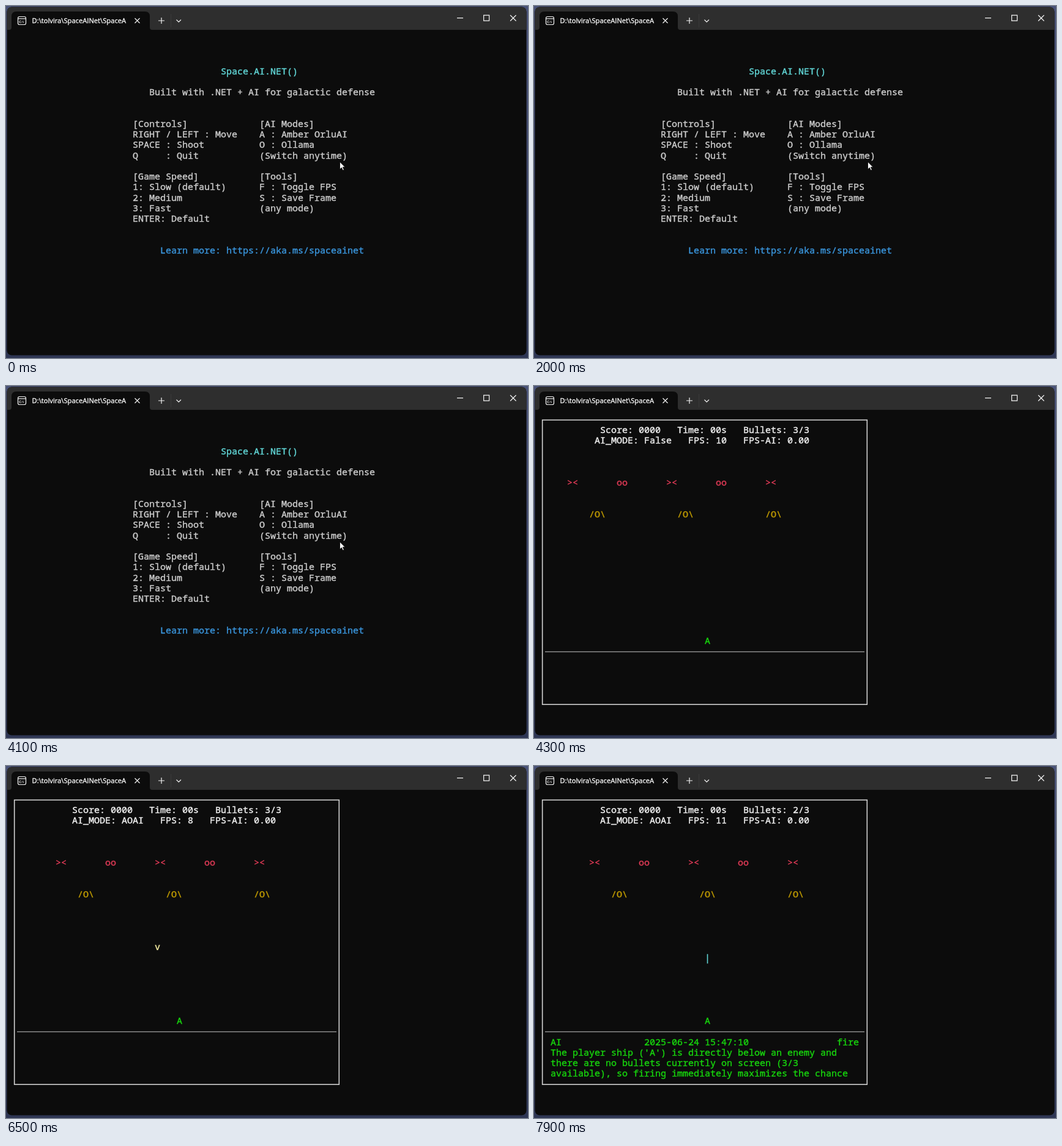
An HTML page that plays this animation: 853 px wide and 576 px high, repeating every 8 s.

```html
<!DOCTYPE html>
<html lang="en">
<head>
<meta charset="utf-8">
<title>Terminal game</title>
<style>
  html, body { margin: 0; width: 100%; height: 100%; overflow: hidden; background: #3b4468; }
  svg { display: block; width: 853px; height: 576px; }
  .cell { font: 15px "Noto Sans Mono", monospace; white-space: pre; font-variant-ligatures: none; stroke-width: .4; }
  .tab { font: 11.2px "Open Sans", "Noto Sans", sans-serif; fill: #fff; stroke: #fff; stroke-width: .3; }
  .icon { fill: none; stroke: #f4f4f4; stroke-width: 1.2; }
</style>
</head>
<body>
<svg viewBox="0 0 853 576">
  <defs>
    <linearGradient id="desk" x2="0" y2="1">
      <stop offset="0" stop-color="#4a5379"/>
      <stop offset="1" stop-color="#2e3654"/>
    </linearGradient>
    <clipPath id="win"><rect x="1.5" y="1.5" width="849" height="570" rx="8"/></clipPath>
    <clipPath id="label"><rect x="40" y="12" width="156.5" height="24"/></clipPath>
  </defs>
  <rect width="853" height="576" fill="url(#desk)"/>
  <g clip-path="url(#win)">
    <rect width="853" height="576" fill="#0c0c0c"/>
    <rect width="853" height="39" fill="#2e2e2e"/>
    <path d="M5 39q4 0 4-4V17q0-8 8-8H227q8 0 8 8V35q0 4 4 4z" fill="#0c0c0c"/>
  </g>
  <g class="icon">
    <rect x="19.5" y="17.5" width="13" height="13" rx="2.5"/>
    <path d="M19.5 20.8h13"/>
    <path d="M210.5 20l8 8m0-8l-8 8M249 24h10m-5-5v10M278.5 22.5l3.7 3.7 3.7-3.7"/>
    <path d="M737 19.6h10M780.6 15.1h9v9h-9zM824 15l9.5 9.5m0-9.5l-9.5 9.5"/>
    <path d="M269.5 13v22" stroke="#3a3a3a" stroke-width="1"/>
  </g>
  <text x="21" y="28.3" fill="#f4f4f4" font-family="Liberation Sans, sans-serif" font-size="6" font-weight="700">C:\</text>
  <text class="tab" x="42.5" y="28" clip-path="url(#label)">D:\tolvira\SpaceAINet\SpaceAINet</text>

  <g id="menu">
    <path d="M545.5 255v12.2l2.9-2.6 2 4.5 2-.9-2-4.4h3.8z" fill="#fff" stroke="#000" stroke-width=".8"/>
  </g>
  <g id="game">
    <rect x="13.7" y="55.6" width="530.6" height="465.5" fill="none" stroke="#d2d2d2" stroke-width="1.6"/>
    <path d="M18 434.8H540" stroke="#a4a4a4" stroke-width="1.2"/>
  </g>
</svg>
<script>
const LOOP = 8000, CELL_W = 9, CELL_H = 17.24;
const GREY = '#cccccc', WHITE = '#f2f2f2', CYAN = '#61d6d6', BLUE = '#3a96dd',
      RED = '#de3a56', GOLD = '#c19c00', GREEN = '#17d40d', CREAM = '#f9f1a5';
const menu = document.getElementById('menu'), game = document.getElementById('game');

function make(parent, tag, attrs) {
  const el = document.createElementNS('http://www.w3.org/2000/svg', tag);
  for (const k in attrs) el.setAttribute(k, attrs[k]);
  return parent.appendChild(el);
}
function place(el, col, row) {
  el.setAttribute('x', col * CELL_W);
  el.setAttribute('y', 60 + row * CELL_H);
}
function print(parent, col, row, str, color) {
  const el = make(parent, 'text', { class: 'cell', fill: color, stroke: color });
  el.textContent = str;
  place(el, col, row);
  return el;
}
function show(el, on) { el.style.display = on ? '' : 'none'; }

// Latest value in a table of [time, value] steps
function at(steps, t) {
  let v = steps[0][1];
  for (const [time, value] of steps) if (t >= time) v = value;
  return v;
}

const block = (col, row, lines) => lines.forEach((s, i) => print(menu, col, row + i, s, GREY));
print(menu, 39, 3, 'Space.AI.NET()', CYAN);
print(menu, 26, 5, 'Built with .NET + AI for galactic defense', GREY);
block(23, 8, ['[Controls]', 'RIGHT / LEFT : Move', 'SPACE : Shoot', 'Q     : Quit']);
block(46, 8, ['[AI Modes]', 'A : Amber OrluAI', 'O : Ollama', '(Switch anytime)']);
block(23, 13, ['[Game Speed]', '1: Slow (default)', '2: Medium', '3: Fast', 'ENTER: Default']);
block(46, 13, ['[Tools]', 'F : Toggle FPS', 'S : Save Frame', '(any mode)']);
print(menu, 28, 20, 'Learn more: https://aka.ms/spaceainet', BLUE);

const score = print(game, 12, 1, '', WHITE);
const stats = print(game, 12, 2, '', WHITE);
const fleet = make(game, 'g', {});
['><', 'oo', '><', 'oo', '><'].forEach((s, i) => print(fleet, i * 9, 6, s, RED));
[4, 20, 36].forEach(col => print(fleet, col, 9, '/O\\', GOLD));
print(game, 31, 21, 'A', GREEN);
const bomb = print(game, 27, 8, 'v', CREAM);
const shot = print(game, 31, 20, '|', CYAN);
const advice = make(game, 'g', {});
[[3, 23, 'AI'], [20, 23, '2025-06-24 15:47:10'], [55, 23, 'fire'],
 [3, 24, "The player ship ('A') is directly below an enemy and"],
 [3, 25, 'there are no bullets currently on screen (3/3'],
 [3, 26, 'available), so firing immediately maximizes the chance']
].forEach(([col, row, s]) => print(advice, col, row, s, GREEN));

const START = 4300, FIRE = 7400;
const fleetCol = [[0, 6], [5000, 7], [5500, 8], [6100, 9], [7000, 10]];
const fps = [[0, 10], [5000, 11], [6000, 8], [7000, 11]];
const mode = [[0, 'False'], [6000, 'AOAI']];

function center(el, str) {
  el.textContent = str;
  el.setAttribute('x', (31 - Math.ceil(str.length / 2)) * CELL_W);
}

function render(t) {
  const playing = t >= START, fired = t >= FIRE;
  show(menu, !playing);
  show(game, playing);
  if (!playing) return;

  center(score, `Score: 0000   Time: 00s   Bullets: ${fired ? 2 : 3}/3`);
  center(stats, `AI_MODE: ${at(mode, t)}   FPS: ${at(fps, t)}   FPS-AI: 0.00`);
  fleet.setAttribute('transform', `translate(${at(fleetCol, t) * CELL_W})`);

  // Shots move one row per tick; the bomb stalls for one tick
  const tick = Math.floor(t / 100);
  const bombRow = 8 + tick - 59 - (tick > 66 ? 1 : 0);
  show(bomb, bombRow >= 8 && bombRow <= 21);
  place(bomb, 27, bombRow);
  show(shot, fired);
  place(shot, 31, 20 - (tick - FIRE / 100));
  show(advice, fired);
}

const begin = performance.now();
function frame() {
  render((performance.now() - begin) % LOOP);
  requestAnimationFrame(frame);
}
render(0);
requestAnimationFrame(frame);
</script>
</body>
</html>
```
